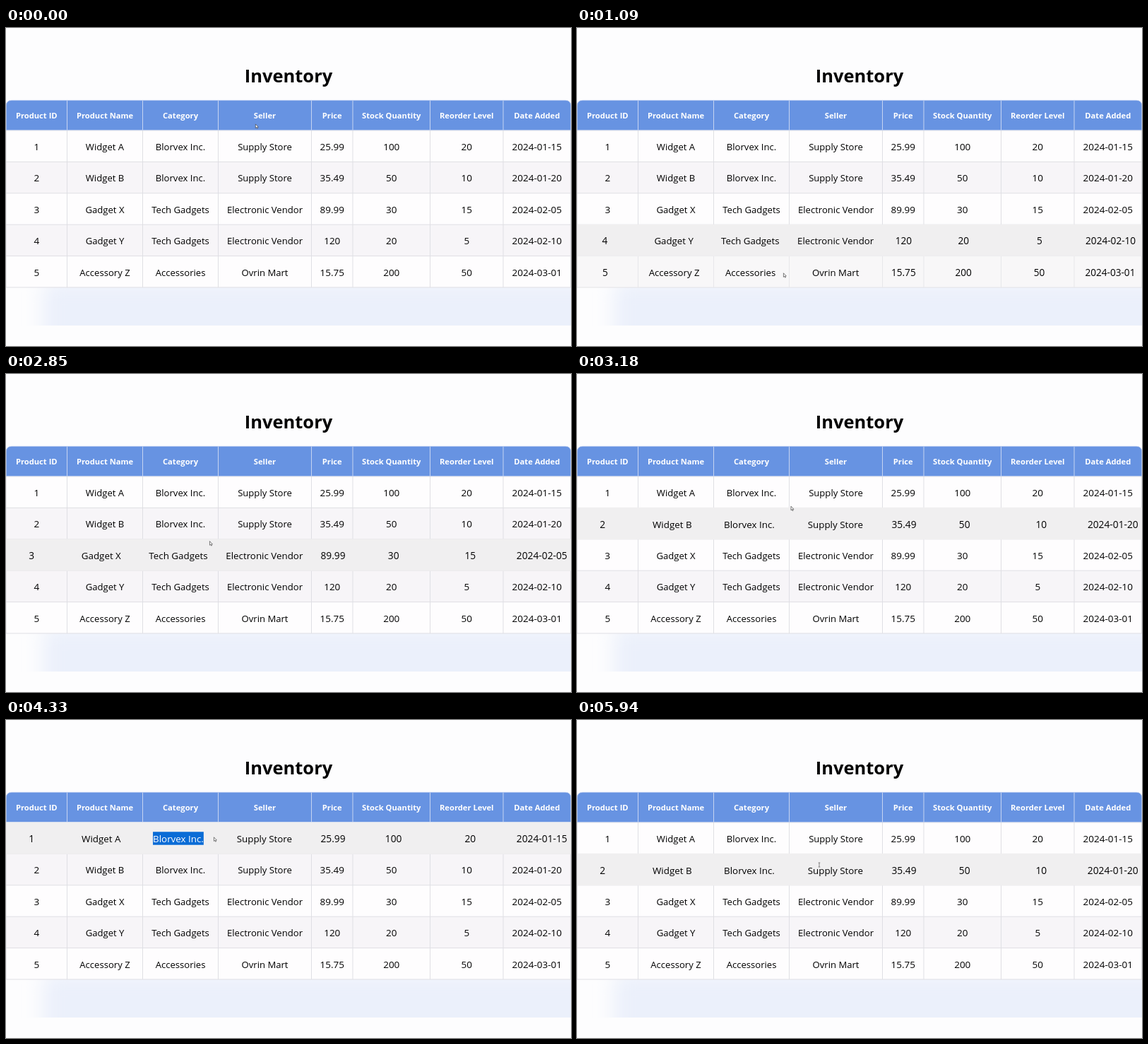
Recreate the animation shown at these times as an HTML page. Size 800 by 450 pixels, loop 5.97 s.

```html
<!DOCTYPE html>
<html lang="en">
<head>
<meta charset="utf-8">
<title>Inventory</title>
<style>
  html, body { margin: 0; width: 100%; height: 100%; overflow: hidden; background: #fdfdfe; }
  svg { display: block; width: 100vw; height: 100vh; }
  text { font-family: "Open Sans", "Noto Sans", sans-serif; text-anchor: middle; fill: #000; user-select: none; }
  .title { font-size: 25.5px; font-weight: 700; }
  .head { font-size: 11.2px; font-weight: 700; fill: #fff; }
  .word { font-size: 13.1px; }
  .num { font-size: 13.5px; }
</style>
</head>
<body>
<svg viewBox="0 0 800 450">
  <defs>
    <filter id="soft" x="-20%" y="-80%" width="140%" height="260%"><feGaussianBlur stdDeviation="14"/></filter>
    <clipPath id="below"><rect y="367" width="800" height="54"/></clipPath>
    <clipPath id="selected"><rect id="selectClip" y="158.5" height="18"/></clipPath>
  </defs>
  <rect width="800" height="450" fill="#fdfdfe"/>
  <g clip-path="url(#below)">
    <rect x="52" y="358" width="820" height="110" rx="10" fill="#ebf0fb" filter="url(#soft)"/>
  </g>
  <text class="title" x="400" y="76.5">Inventory</text>
  <g id="grid"></g>
  <g id="rows"></g>
  <g id="pointer">
    <path id="arrow" d="M-1.6-3.2V2.4L-.3 1.3L.6 3.2L1.5 2.8L.7 1H2.3Z" fill="#fff" stroke="#444" stroke-width=".7"/>
    <path id="beam" d="M-1.3-3H1.3M0-3V3M-1.3 3H1.3" fill="none" stroke="#555" stroke-width=".7"/>
  </g>
</svg>
<script>
const LOOP = 5970, FADE = 300, TOP = 145, PITCH = 44.4, GROW = 0.02;
const BASELINE = 28, LINE = "#dfdfe4", HEAD_LINE = "#c6d4f1";
const edges = [0, 86.5, 193.5, 300.5, 432.5, 491, 600.5, 704, 799.5];
const heads = ["Product ID", "Product Name", "Category", "Seller", "Price", "Stock Quantity", "Reorder Level", "Date Added"];
const data = `
1|Widget A|Blorvex Inc.|Supply Store|25.99|100|20|2024-01-15
2|Widget B|Blorvex Inc.|Supply Store|35.49|50|10|2024-01-20
3|Gadget X|Tech Gadgets|Electronic Vendor|89.99|30|15|2024-02-05
4|Gadget Y|Tech Gadgets|Electronic Vendor|120|20|5|2024-02-10
5|Accessory Z|Accessories|Ovrin Mart|15.75|200|50|2024-03-01`.trim().split("\n").map(line => line.split("|"));

// Pointer stops: time, x, y. Row hovers follow from this path.
const DRAG_FROM = 3900, DRAG_TO = 4330, DESELECT = 5730;
const path = [
  [0, 355, 139], [1010, 297, 323], [1090, 294, 350], [1580, 294, 350], [1940, 284, 302],
  [2250, 286, 278], [2850, 290, 240], [3190, 305, 189], [3480, 312, 170], [DRAG_FROM, 208, 169],
  [DRAG_TO, 296, 169], [4990, 296, 169], [5210, 318, 202], [5480, 343, 205], [LOOP, 343, 205]
];

const byId = id => document.getElementById(id);
const clamp = v => Math.max(0, Math.min(1, v));
const mix = (a, b, k) => a + (b - a) * k;
const center = col => (edges[col] + edges[col + 1]) / 2;
const rowTop = row => TOP + PITCH * row;
const rowAt = y => Math.floor((y - TOP) / PITCH);

function add(parent, tag, attrs, content) {
  const node = document.createElementNS("http://www.w3.org/2000/svg", tag);
  for (const key in attrs) node.setAttribute(key, attrs[key]);
  if (content) node.textContent = content;
  return parent.appendChild(node);
}

// CSS "ease": cubic-bezier(.25, .1, .25, 1)
function ease(p) {
  if (p <= 0 || p >= 1) return clamp(p);
  let lo = 0, hi = 1, u;
  for (let i = 0; i < 20; i++) {
    u = (lo + hi) / 2;
    if (0.75 * u * (1 - u) + u ** 3 < p) lo = u; else hi = u;
  }
  return 0.3 * u * (1 - u) ** 2 + 3 * u * u * (1 - u) + u ** 3;
}

function pointerAt(t) {
  const i = Math.max(1, path.findIndex(stop => stop[0] >= t));
  const [t0, x0, y0] = path[i - 1], [t1, x1, y1] = path[i];
  const k = (t - t0) / (t1 - t0);
  return [mix(x0, x1, k), mix(y0, y1, k)];
}

const hovers = [];
for (let t = 0, last = -1; t < LOOP; t += 5) {
  const row = rowAt(pointerAt(t)[1]);
  if (row === last) continue;
  if (hovers.length) hovers[hovers.length - 1].end = t;
  hovers.push({ row, start: t, end: Infinity });
  last = row;
}

function hoverAmount(row, t) {
  return clamp(hovers.filter(h => h.row === row).reduce((sum, h) =>
    sum + ease((t - h.start) / FADE) - ease((t - h.end) / FADE), 0));
}

const grid = byId("grid");
data.forEach((_, r) => add(grid, "rect", { y: rowTop(r), width: 800, height: PITCH, fill: r % 2 ? "#f7f5f8" : "#fefdfe" }));
for (const x of edges) add(grid, "path", { d: `M${x} ${TOP}V${rowTop(data.length)}`, stroke: LINE });
for (let r = 0; r <= data.length; r++) add(grid, "path", { d: `M0 ${rowTop(r)}H800`, stroke: LINE });
add(grid, "path", { d: "M.3 144.5V110Q.3 102.3 8 102.3H792Q799.7 102.3 799.7 110V144.5Z", fill: "#6793e2", stroke: HEAD_LINE, "stroke-width": .6 });
for (const x of edges.slice(1, -1)) add(grid, "path", { d: `M${x} 102.5V144.5`, stroke: HEAD_LINE });
heads.forEach((label, c) => add(grid, "text", { class: "head", x: center(c), y: 128.2 }, label));

const rows = data.map((cells, r) => {
  const group = add(byId("rows"), "g", {});
  const back = add(group, "rect", { y: rowTop(r), width: 800, height: PITCH });
  const texts = cells.map((cell, c) => add(group, "text", {
    class: /^[\d.-]+$/.test(cell) ? "num" : "word", x: center(c), y: rowTop(r) + BASELINE
  }, cell));
  return { group, back, texts };
});
const picked = rows[0].texts[2];
const selection = add(rows[0].group, "g", { "clip-path": "url(#selected)" });
add(selection, "rect", { x: edges[2], y: TOP, width: edges[3] - edges[2], height: PITCH, fill: "#0a6cd6" });
add(selection, "text", { class: "word", x: center(2), y: TOP + BASELINE, style: "fill:#fff" }, data[0][2]);

function overText(x, y) {
  return rows.some(({ texts }, r) => Math.abs(y - rowTop(r) - 23.5) < 9 && texts.some((node, c) =>
    Math.abs(x - center(c)) < node.getComputedTextLength() / 2 + 1));
}

function draw(t) {
  rows.forEach(({ group, back }, r) => {
    const amount = hoverAmount(r, t), striped = r % 2;
    const cy = rowTop(r) + PITCH / 2;
    group.setAttribute("transform", `translate(400 ${cy}) scale(${1 + GROW * amount}) translate(-400 ${-cy})`);
    // Striped rows are opaque, plain rows let the grid show through.
    const tint = striped ? Math.min(1, amount * 1.8) : 1;
    back.setAttribute("fill", `rgb(${mix(247, 240, tint)},${mix(245, 239, tint)},${mix(248, 240, tint)})`);
    back.setAttribute("opacity", striped ? Math.ceil(amount) : amount);
  });

  const [x, y] = pointerAt(t), beam = overText(x, y);
  const width = picked.getComputedTextLength(), left = center(2) - width / 2;
  const dragged = t < DRAG_FROM || t >= DESELECT ? 0 : t < DRAG_TO ? clamp((x - left) / width) : 1;
  byId("selectClip").setAttribute("x", left);
  byId("selectClip").setAttribute("width", width * dragged);

  byId("pointer").setAttribute("transform", `translate(${x} ${y})`);
  byId("arrow").style.display = beam ? "none" : "";
  byId("beam").style.display = beam ? "" : "none";
}

const began = performance.now();
function frame() {
  draw((performance.now() - began) % LOOP);
  requestAnimationFrame(frame);
}
frame();
</script>
</body>
</html>
```
